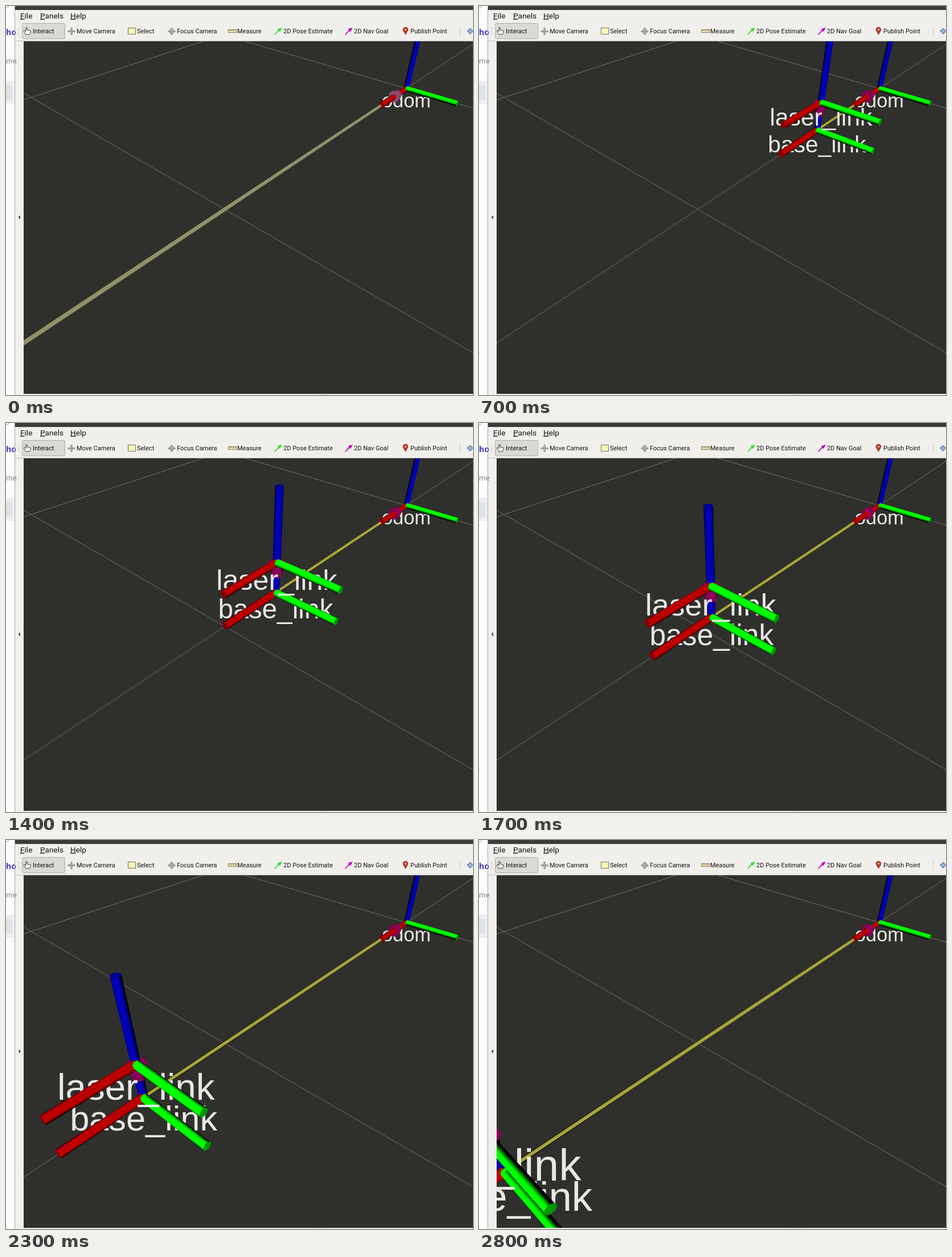
Animation, 820 px wide and 683 px high, one loop 2.9 s. Source, as an HTML page with a canvas:

```html
<!DOCTYPE html>
<html lang="en">
<head>
<meta charset="utf-8">
<title>Frames view</title>
<style>
  html, body { margin: 0; width: 100%; height: 100%; overflow: hidden; background: #f0efec; }
  svg, canvas { position: absolute; left: 0; top: 0; }
  canvas { left: 31px; top: 62px; }
  text { font-family: Roboto, "Open Sans", sans-serif; fill: #111; }
  .menu { font-size: 13.6px; }
  .tool { font-size: 11px; }
  .side { font-family: "Open Sans", sans-serif; }
</style>
</head>
<body>
<svg width="820" height="683">
  <rect width="15" height="683" fill="#fdfdfd"/>
  <path d="M0 3Q5 3 5 0" fill="none" stroke="#999"/>
  <rect y="131" width="15" height="41" fill="#eceef0"/>
  <rect x="-6" y="139" width="17" height="26" rx="3" fill="#dfe3e8"/>
  <text class="side" y="51" font-size="14" font-weight="700" style="fill:#4338c8">ho</text>
  <text class="side" y="101" font-size="12.5" style="fill:#777">me</text>
  <path d="M15.500 0V683" stroke="#a9a7a3"/>
  <rect x="16" width="804" height="7" fill="#3c3b37"/>
  <path d="M16 61.500H820" stroke="#c2bfba"/>
  <g class="menu">
    <text x="25" y="21.500"><tspan text-decoration="underline">F</tspan>ile</text>
    <text x="60" y="21.500"><tspan text-decoration="underline">P</tspan>anels</text>
    <text x="113" y="21.500"><tspan text-decoration="underline">H</tspan>elp</text>
  </g>
  <path d="M22.500 38V53" stroke="#bbb" stroke-width="2" stroke-dasharray="1 2"/>
  <rect x="28.500" y="30.500" width="75" height="27" rx="2" fill="#dbd9d5" stroke="#b1ada7"/>
  <g class="tool">
    <text x="47" y="48">Interact</text>
    <text x="124" y="48">Move Camera</text>
    <text x="230" y="48">Select</text>
    <text x="300" y="48">Focus Camera</text>
    <text x="406" y="48">Measure</text>
    <text x="487" y="48">2D Pose Estimate</text>
    <text x="611" y="48">2D Nav Goal</text>
    <text x="710" y="48">Publish Point</text>
  </g>
  <path d="M35 50L31 44L33 43L35 45V38H37V42L43 43.500V47L41 50Z" fill="#fff" stroke="#333"/>
  <g fill="none" stroke="#777">
    <path d="M115 38V51M108.500 44.500H121.500M113 40L115 38L117 40M113 49L115 51L117 49M110.500 42.500L108.500 44.500L110.500 46.500M119.500 42.500L121.500 44.500L119.500 46.500"/>
    <circle cx="115" cy="44.500" r="3"/>
    <path d="M291 38V51M284.500 44.500H297.500"/>
    <path d="M291 38.500L297 44.500L291 50.500L285 44.500Z"/>
    <circle cx="291" cy="44.500" r="3"/>
  </g>
  <rect x="214.500" y="38.500" width="13" height="11" fill="#fbf6b4" stroke="#333" stroke-dasharray="2 1"/>
  <rect x="390.500" y="41.500" width="14" height="5" fill="#ece0b0" stroke="#8a7a4c"/>
  <path d="M393.500 42V44M396.500 42V44M399.500 42V44M402.500 42V44" stroke="#8a7a4c"/>
  <path id="arrow" d="M471 50L478 42L477 40L485 38L481 45L479 44L472 51Z" fill="#2be32b"/>
  <path transform="translate(124)" d="M471 50L478 42L477 40L485 38L481 45L479 44L472 51Z" fill="#c800c8"/>
  <path d="M701.500 51L697.500 44A4.700 4.700 0 1 1 705.500 44Z" fill="#b23a2a"/>
  <circle cx="701.500" cy="41.500" r="1.500" fill="#f3d8d0"/>
  <path d="M797.500 36V53" stroke="#cfccc8"/>
  <path d="M815 39.500V49M810 44H820" stroke="#41699f" stroke-width="4"/>
  <path d="M815 40.500V48M811 44H820" stroke="#a9c6ea" stroke-width="2"/>
  <path d="M25 367.500V374.500L21.500 371Z" fill="#444"/>
  <path d="M549 683H565" stroke="#999" stroke-dasharray="1 2"/>
</svg>
<canvas width="789" height="619"></canvas>
<script>
const ctx = document.querySelector('canvas').getContext('2d');

// Perspective camera: homogeneous screen vectors for the world origin and one metre along x, y, z.
const ORIGIN = [703, 145, 1];
const BASIS = [[-453.5, 86.9, -0.3505], [207.7, 79.4, -0.3004], [-168.1, -501.4, -0.3847]];
const CENTER = { x: 425, y: 371 }, FOCAL = 750;
const LASER_HEIGHT = 0.0933, AXIS_LENGTH = 0.2, AXIS_WIDTH = 9.3;
const AXES = [
  { body: [188, 0, 0], cap: '#850000' },
  { body: [0, 255, 0], cap: '#009600' },
  { body: [0, 0, 182], cap: '#000092' },
];

function project(point) {
  const [u, v, w] = ORIGIN.map((o, i) => o + BASIS.reduce((sum, b, k) => sum + b[i] * point[k], 0));
  return { x: u / w, y: v / w, w };
}

function along(point, axis, distance) {
  const moved = [...point];
  moved[axis] += distance;
  return moved;
}

function line(from, to) {
  const a = project(from), b = project(to);
  ctx.beginPath();
  ctx.moveTo(a.x, a.y);
  ctx.lineTo(b.x, b.y);
  ctx.stroke();
}

// Tapered round bar lit along the view axis, so its side facing the screen centre is darker.
function bar(from, to, widthA, widthB, color) {
  const a = project(from), b = project(to);
  const dx = b.x - a.x, dy = b.y - a.y, length = Math.hypot(dx, dy);
  const nx = -dy / length, ny = dx / length;
  const ra = widthA / 2 / a.w, rb = widthB / 2 / b.w, r = (ra + rb) / 2;
  const mx = (a.x + b.x) / 2, my = (a.y + b.y) / 2;
  const tilt = 1.8 * Math.atan(((CENTER.x - mx) * nx + (CENTER.y - my) * ny) / FOCAL);
  const shade = ctx.createLinearGradient(mx - nx * r, my - ny * r, mx + nx * r, my + ny * r);
  for (let s = -1; s <= 1; s += 0.125) {
    const light = Math.min(1, Math.max(0, 1.3 * Math.cos(Math.asin(s) + tilt)));
    shade.addColorStop((s + 1) / 2, `rgb(${color.map(c => Math.round(c * light))})`);
  }
  ctx.fillStyle = shade;
  ctx.beginPath();
  ctx.moveTo(a.x - nx * ra, a.y - ny * ra);
  ctx.lineTo(b.x - nx * rb, b.y - ny * rb);
  ctx.lineTo(b.x + nx * rb, b.y + ny * rb);
  ctx.lineTo(a.x + nx * ra, a.y + ny * ra);
  ctx.fill();
}

function disc(center, axis, radius, color) {
  ctx.fillStyle = color;
  ctx.beginPath();
  for (let k = 0; k < 24; k++) {
    const angle = k * Math.PI / 12;
    const rim = along(along(center, (axis + 1) % 3, radius * Math.cos(angle)),
      (axis + 2) % 3, radius * Math.sin(angle));
    const p = project(rim);
    ctx.lineTo(p.x, p.y);
  }
  ctx.fill();
}

function rod(from, axis, length) {
  const { body, cap } = AXES[axis], to = along(from, axis, length);
  disc(from, axis, 0.008, `rgb(${body})`);
  bar(from, to, AXIS_WIDTH, AXIS_WIDTH, body);
  disc(to, axis, 0.01, cap);
}

function label(text, point) {
  const p = project(point);
  ctx.font = `${34.4 / p.w}px "Liberation Sans", Arial, sans-serif`;
  ctx.fillStyle = '#e8e8e5';
  ctx.fillText(text, p.x, p.y + 32.8 / p.w);
}

function axes(point) {
  for (const axis of [2, 0, 1]) rod(point, axis, AXIS_LENGTH);
}

function arrowHead(wide, narrow, axis, color) {
  bar(wide, narrow, 20, 10, color);
  disc(wide, axis, 0.022, `rgb(${color})`);
}

function draw(time) {
  const lost = time < 100;
  const x = lost ? 2 : (time + 187) / 1988;
  const odom = [0, 0, 0], base = [x, 0, 0], laser = [x, 0, LASER_HEIGHT];
  const headColor = [140, 0, 88];

  ctx.setTransform(1, 0, 0, 1, 0, 0);
  ctx.fillStyle = '#2f2f2c';
  ctx.fillRect(0, 0, 789, 619);
  ctx.translate(-31, -62);
  ctx.textAlign = 'center';
  ctx.strokeStyle = '#777775';
  ctx.lineWidth = 0.9;
  line([-1, 0, 0], [2, 0, 0]);
  line([-1, -1, 0], [2, -1, 0]);
  line([0, -2, 0], [0, 2, 0]);
  line([1, -2, 0], [1, 1, 0]);

  label('odom', odom);
  axes(odom);
  arrowHead([0.1, 0, 0], [0.05, 0, 0], 0, lost ? [138, 74, 112] : headColor);
  rod([0.1, 0, 0], 0, 0.1);
  if (x > AXIS_LENGTH) {
    bar([AXIS_LENGTH, 0, 0], base, 4.2, 4.2, lost ? [145, 145, 105] : [166, 166, 60]);
  }
  if (lost) return;

  label('base_link', base);
  axes(base);
  arrowHead(laser, [x, 0, LASER_HEIGHT / 2], 2, headColor);
  label('laser_link', laser);
  axes(laser);
}

function tick() {
  draw(Math.floor(performance.now() % 2900 / 100) * 100);
  requestAnimationFrame(tick);
}
tick();
</script>
</body>
</html>
```
